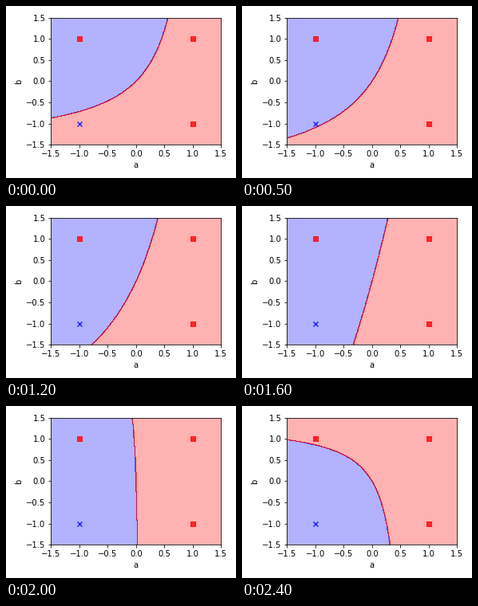
Write a matplotlib script that moves like this. It is 288 by 216 pixels and loops after 2500 ms.

```python
import matplotlib.pyplot as plt
import numpy as np
from matplotlib.animation import FuncAnimation
from matplotlib.colors import ListedColormap

W, H, DPI = 288, 216, 72
FRAMES, INTERVAL = 25, 100
LIM = 1.5

# Weights of the boundary a + u*b + v*a*b = 0 at a few epochs
EPOCHS = np.array([0, 5, 9, 12, 16, 20, 24], float)
U = np.array([-0.745, -0.5015, -0.424, -0.345, -0.203, 0.0217, 0.442])
V = np.array([0.656, 0.412, 0.320, 0.225, 0.053, -0.352, -0.726])


def hermite(t, xs, ys):
    """Smooth cubic curve through the points (xs, ys)."""
    slopes = np.gradient(ys, xs, edge_order=2)
    i = min(np.searchsorted(xs, t, side="right") - 1, len(xs) - 2)
    h = xs[i + 1] - xs[i]
    s = (t - xs[i]) / h
    return (
        (1 + 2 * s) * (1 - s) ** 2 * ys[i]
        + s * (1 - s) ** 2 * h * slopes[i]
        + s**2 * (3 - 2 * s) * ys[i + 1]
        + s**2 * (s - 1) * h * slopes[i + 1]
    )


fig, ax = plt.subplots(figsize=(W / DPI, H / DPI), dpi=DPI)
fig.subplots_adjust(
    left=56.4 / W, right=269.3 / W, bottom=41.7 / H, top=201.4 / H
)
ticks = np.arange(-LIM, LIM + 0.1, 0.5)
ax.set(xlim=(-LIM, LIM), ylim=(-LIM, LIM), xticks=ticks, yticks=ticks,
       xlabel="a", ylabel="b")

ax.scatter([-1], [-1], c="blue", marker="x", alpha=0.8, zorder=3)
ax.scatter([-1, 1, 1], [1, 1, -1], c="red", marker="s", alpha=0.8, zorder=3)

axis = np.linspace(-LIM, LIM, 300)
A, B = np.meshgrid(axis, axis)
cmap = ListedColormap(["blue", "red"])
regions = None


def update(epoch):
    global regions
    if regions is not None:
        regions.remove()
    u, v = hermite(epoch, EPOCHS, U), hermite(epoch, EPOCHS, V)
    label = np.where(A + u * B + v * A * B >= 0, 1, -1)
    regions = ax.contourf(A, B, label, alpha=0.3, cmap=cmap)
    return []


anim = FuncAnimation(fig, update, frames=FRAMES, interval=INTERVAL,
                     repeat=True, repeat_delay=0, blit=False)
plt.show()
```
